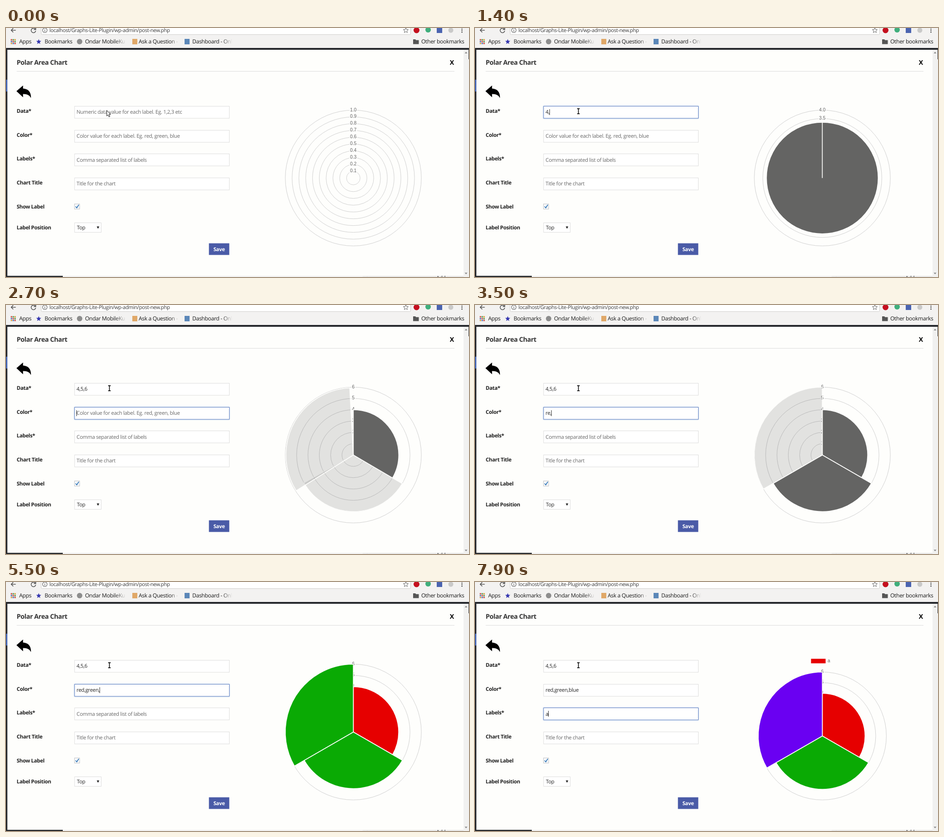
Animation of 1019x549 px, one loop 8000 ms. Source, as an HTML page with a canvas:

```html
<!DOCTYPE html>
<html lang="en">
<head>
<meta charset="utf-8">
<title>Polar Area Chart</title>
<style>
  html, body { margin: 0; width: 100%; height: 100%; overflow: hidden; background: #fefefc; }
  svg, canvas { position: absolute; left: 0; top: 0; }
  text {
    font: 11.5px "Open Sans", "Noto Sans", sans-serif;
    letter-spacing: -.031em;
    text-rendering: geometricPrecision;
    white-space: pre;
    fill: #262626;
  }
  .bar text { font-size: 12.2px; fill: #1c1c1c; }
  .bar .url { font-size: 11.35px; fill: #3a3a3a; }
  .label text, .bold { font-weight: 700; fill: #1f1f1f; }
  .title { font-size: 14.4px; fill: #333; }
  .box { fill: #fff; stroke: #ddd; }
  .box.focus { stroke: #6583c2; filter: drop-shadow(0 0 .8px #7fa3dc); }
  .hint { fill: #686868; }
</style>
</head>
<body>
<svg width="1019" height="549" viewBox="0 0 1019 549">
  <defs>
    <linearGradient id="fade">
      <stop offset="0" stop-color="#f3f2f1" stop-opacity="0"/>
      <stop offset="1" stop-color="#f3f2f1"/>
    </linearGradient>
    <path id="star" d="M0 -5.5 1.5 -1.7 5.5 -1.4 2.4 1.2 3.4 5.2 0 3 -3.4 5.2 -2.4 1.2 -5.5 -1.4 -1.5 -1.7Z"/>
    <path id="ibeam" d="M224.8 177.8H230.4M227.6 177.8V189.2M224.8 189.2H230.4"/>
  </defs>

  <!-- browser bars -->
  <g class="bar">
    <rect width="1019" height="45" fill="#f3f2f1"/>
    <rect x="77.5" y="-10" width="813" height="24.5" rx="2" fill="#fff" stroke="#cfcdcb"/>
    <path d="M21.5 5H11.5M16 .5 11.5 5 16 9.5" fill="none" stroke="#555" stroke-width="1.7"/>
    <path d="M64.5 2.5A5 5 0 1 0 65.4 6M65.5 -1V3.5H61" fill="none" stroke="#555" stroke-width="1.6"/>
    <circle cx="85.5" cy="5" r="5" fill="none" stroke="#666" stroke-width="1.2"/>
    <path d="M85.5 4.3V8M85.5 2V3.3" stroke="#666" stroke-width="1.3"/>
    <text class="url" x="95.5" y="9">localhost/Graphs-Lite-Plugin/wp-admin/post-new.php</text>
    <use href="#star" x="880" y="5" fill="none" stroke="#666"/>
    <circle cx="903.5" cy="5" r="6.5" fill="#c4101e"/>
    <circle cx="929" cy="4" r="6" fill="#3fae7c"/>
    <rect x="948" y="0" width="12" height="11" fill="#4a63b0"/>
    <circle cx="979" cy="5" r="5.5" fill="#c9c9c9"/>
    <g fill="#555">
      <circle cx="1003.5" cy="0" r="1.4"/>
      <circle cx="1003.5" cy="4.5" r="1.4"/>
      <circle cx="1003.5" cy="9" r="1.4"/>
    </g>

    <g id="apps"></g>
    <text x="29" y="34">Apps</text>
    <use href="#star" x="72" y="30" fill="#3436b0"/>
    <text x="85" y="34">Bookmarks</text>
    <circle cx="162" cy="30" r="6" fill="#8d8d8d"/>
    <text x="174" y="34">Ondar MobileKu</text>
    <rect x="278" y="24" width="11" height="12" fill="#e0a868"/>
    <text x="292" y="34">Ask a Question -</text>
    <rect x="393" y="24" width="11" height="12" fill="#5b87b8"/>
    <text x="410" y="34">Dashboard - Onli</text>
    <rect x="240" y="21" width="24" height="18" fill="url(#fade)"/>
    <rect x="263.5" y="21" width="8" height="18" fill="#f3f2f1"/>
    <rect x="362" y="21" width="18" height="18" fill="url(#fade)"/>
    <rect x="379.5" y="21" width="12" height="18" fill="#f3f2f1"/>
    <rect x="475" y="21" width="23" height="18" fill="url(#fade)"/>
    <rect x="497.5" y="21" width="20" height="18" fill="#f3f2f1"/>
    <path d="M896 35.5V25H901L902.500 26.700H908.500V35.500Z" fill="#555"/>
    <text x="914" y="34">Other bookmarks</text>
  </g>

  <!-- page behind and panel -->
  <path d="M0 44H1019V48H3V549H0Z" fill="#25272c"/>
  <rect y="114" width="3" height="26" fill="#4566b4"/>
  <rect x="3" y="48" width="1004" height="499" fill="#fefefc"/>
  <rect x="3" y="546.5" width="1004" height="3" fill="#f1f1f1"/>
  <rect x="3" y="546.5" width="122" height="3" fill="#1f2226"/>
  <path d="M785 547.5H795V549M795 547.5H1007" stroke="#ddd" fill="none"/>
  <text x="947" y="555">Add</text>
  <rect x="1007" y="48" width="12" height="501" fill="#f1f1f0"/>
  <path d="M1009.5 56 1012.5 52.5 1015.5 56ZM1009.5 539.5 1012.5 543 1015.5 539.5Z" fill="#888"/>
  <rect x="1018" y="48" width="1" height="21" fill="#333"/>

  <text class="bold title" x="23.5" y="81">Polar Area Chart</text>
  <text class="bold" x="981.3" y="81" text-anchor="middle" style="font-size:14px;fill:#000">X</text>
  <path d="M23.5 95.5H987" stroke="#dcdcdc"/>
  <path d="M23 139.3 37.5 126.7V133.4C48 133.7 55.5 140 55 154.6C52 148.3 47 145.7 37.500 145.500V152.700Z"/>

  <g class="label">
    <text x="23.5" y="187">Data*</text>
    <text x="23.5" y="239.500">Color*</text>
    <text x="23.5" y="292">Labels*</text>
    <text x="23.5" y="345">Chart Title</text>
    <text x="23.5" y="397.5">Show Label</text>
    <text x="23.5" y="444">Label Position</text>
  </g>
  <g id="fields"></g>
  <path id="caret" stroke="#222"/>

  <rect x="150.8" y="388" width="11.2" height="11.2" fill="#fff" stroke="#b9bcc0"/>
  <path d="M153 393.5 155.8 396.5 160.2 389.8" fill="none" stroke="#2f74b5" stroke-width="1.8"/>
  <rect class="box" x="151" y="429.5" width="58.5" height="21"/>
  <text x="156" y="444">Top</text>
  <path d="M199.7 437.5H205.3L202.5 442.8Z" fill="#222"/>
  <rect x="446.6" y="474.7" width="44.8" height="25.7" fill="#4a5ba7"/>
  <text class="bold" x="469" y="492" text-anchor="middle" style="fill:#fff">Save</text>
</svg>
<canvas id="chart" width="1019" height="549"></canvas>
<svg width="1019" height="549" viewBox="0 0 1019 549">
  <path id="arrow" d="M221.8 181.5V194L224.6 191.5 226.6 196 228.7 195 226.7 190.7H230.3Z" fill="#fff" stroke="#111"/>
  <g id="beam">
    <use href="#ibeam" stroke="#fff" stroke-width="3.6"/>
    <use href="#ibeam" stroke="#111" stroke-width="1.7"/>
  </g>
</svg>

<script>
const LOOP = 8000, STEP = 100;
const $ = id => document.getElementById(id);
const ctx = $('chart').getContext('2d');

function add(parent, tag, attrs) {
  const el = document.createElementNS('http://www.w3.org/2000/svg', tag);
  for (const key in attrs) el.setAttribute(key, attrs[key]);
  return parent.appendChild(el);
}

const appHues = ['#d0453b', '#4c9a52', '#d59a35', '#4a6fb8'];
for (let i = 0; i < 9; i++) {
  add($('apps'), 'rect', {
    x: 10.5 + i % 3 * 4, y: 24.5 + Math.floor(i / 3) * 4,
    width: 3, height: 3, fill: appHues[i % 4]
  });
}

// Typing: [time, content] pairs; focus holds from and to
const fields = [
  { hint: 'Numeric data value for each label. Eg. 1,2,3 etc', focus: [400, 2500],
    keys: [[800, '4'], [1200, '4,'], [1500, '4,5'], [1700, '4,5,'], [1900, '4,5,6']] },
  { hint: 'Color value for each label. Eg. red, green, blue', focus: [2500, 6500],
    keys: [[2800, 'r'], [2900, 're'], [3300, 're,'], [3800, 're'], [3900, 'red'], [4200, 'red,'],
      [4600, 'red,g'], [4700, 'red,gr'], [4900, 'red,gre'], [5000, 'red,gree'], [5200, 'red,green'],
      [5400, 'red,green,'], [5600, 'red,green,b'], [5800, 'red,green,bl'],
      [6000, 'red,green,blu'], [6100, 'red,green,blue']] },
  { hint: 'Comma separated list of labels', focus: [6500, LOOP], keys: [[7800, 'a']] },
  { hint: 'Title for the chart', focus: [LOOP, LOOP], keys: [] }
];
fields.forEach((f, i) => {
  f.y = Math.round(172 + i * 52.6) + .5;
  f.box = add($('fields'), 'rect', { x: 151, y: f.y, width: 340.5, height: 26.5 });
  f.text = add($('fields'), 'text', { x: 155.3, y: 189.3 + i * 52.6 });
});

const lastKey = (f, t) => f.keys.filter(k => k[0] <= t).pop() || [f.focus[0], ''];

function drawForm(t) {
  let caret = '';
  for (const f of fields) {
    const [at, value] = lastKey(f, t);
    const focused = t >= f.focus[0] && t < f.focus[1];
    f.box.setAttribute('class', focused ? 'box focus' : 'box');
    f.text.setAttribute('class', value ? '' : 'hint');
    f.text.textContent = value || f.hint;
    if (focused && (t - at) % 1000 < 500) {
      const x = 155.5 + (value ? f.text.getComputedTextLength() : 0);
      caret = `M${x} ${f.y + 6.5}v13`;
    }
  }
  $('caret').setAttribute('d', caret);
  $('arrow').style.display = t < 400 ? '' : 'none';
  $('beam').style.display = t < 400 ? 'none' : '';
}

// Each update eases from the pose of the moment to its own layout
const CX = 764.4;
const plain = { cy: 330.8, radius: 149.7 };
const withLegend = { cy: 339.5, radius: 141 };
const updates = [
  { at: -1000, data: [0], max: 1, step: .1, area: plain },
  { at: 1050, data: [4], max: 4, step: .5, area: plain },
  { at: 1605, data: [4, 5], max: 5, step: .5, area: plain },
  { at: 2004, data: [4, 5, 6], max: 6, step: 1, area: plain },
  { at: 6595, data: [4, 5, 6], max: 6, step: 1, area: withLegend }
];
const palette = { red: '#e60000', green: '#0aaa04', blue: '#6a00f2' };

const easeOut = p => 1 - (1 - Math.min(1, p)) ** 4;

function pose(k, t) {
  const { at, data, max, area } = updates[k];
  const turn = 360 / data.length;
  const goal = data.map((v, i) => [area.cy, area.radius * v / max, i * turn - 90, (i + 1) * turn - 90]);
  if (k === 0) return goal;
  const from = pose(k - 1, at), p = easeOut((t - at) / 1000);
  return goal.map((slice, i) => {
    const start = from[i] || [area.cy, 0, -90, -90];
    return slice.map((v, j) => start[j] + (v - start[j]) * p);
  });
}

function drawScale({ max, step, area }) {
  ctx.font = '10.2px "Liberation Sans", Arial, sans-serif';
  ctx.textAlign = 'center';
  ctx.textBaseline = 'middle';
  ctx.lineWidth = .9;
  ctx.strokeStyle = '#cacaca';
  const count = Math.round(max / step);
  for (let i = 1; i <= count; i++) {
    const r = area.radius * i / count, y = area.cy - r;
    const label = (i * step).toFixed(step < 1 ? 1 : 0);
    const w = ctx.measureText(label).width + 3.4;
    ctx.beginPath();
    ctx.arc(CX, area.cy, r, 0, 2 * Math.PI);
    ctx.stroke();
    ctx.fillStyle = 'rgba(254,254,252,.75)';
    ctx.fillRect(CX - w / 2, y - 6.8, w, 13.6);
    ctx.fillStyle = '#646463';
    ctx.fillText(label, CX, y - .4);
  }
}

function drawChart(t) {
  const k = updates.filter(u => u.at <= t).length - 1;
  // The last letters reach the chart when the field is left
  const names = lastKey(fields[1], t < 6400 ? Math.min(t, 6000) : t)[1].split(',');
  ctx.clearRect(0, 0, 1019, 549);
  drawScale(updates[k]);

  // An unknown colour name keeps the fill in use before it
  ctx.strokeStyle = '#fefefc';
  ctx.lineWidth = 1.7;
  pose(k, t).forEach(([cy, r, a, b], i) => {
    if (r <= 0) return;
    if (i >= names.length) ctx.fillStyle = 'rgba(0,0,0,.11)';
    else if (palette[names[i]]) ctx.fillStyle = palette[names[i]];
    ctx.beginPath();
    ctx.arc(CX, cy, r, a * Math.PI / 180, b * Math.PI / 180);
    ctx.lineTo(CX, cy);
    ctx.closePath();
    ctx.fill();
    ctx.stroke();
  });

  if (updates[k].area === withLegend) {
    const label = lastKey(fields[2], t)[1];
    ctx.fillStyle = palette.red;
    ctx.fillRect(label ? 739.6 : 742.2, 169.3, 32, 10);
    ctx.fillStyle = '#646463';
    ctx.fillText(label, 778.8, 173.8);
  }
}

let begin;
function frame(now) {
  begin ??= now;
  const t = Math.floor((now - begin) % LOOP / STEP) * STEP;
  drawForm(t);
  drawChart(t);
  requestAnimationFrame(frame);
}
requestAnimationFrame(frame);
</script>
</body>
</html>
```
